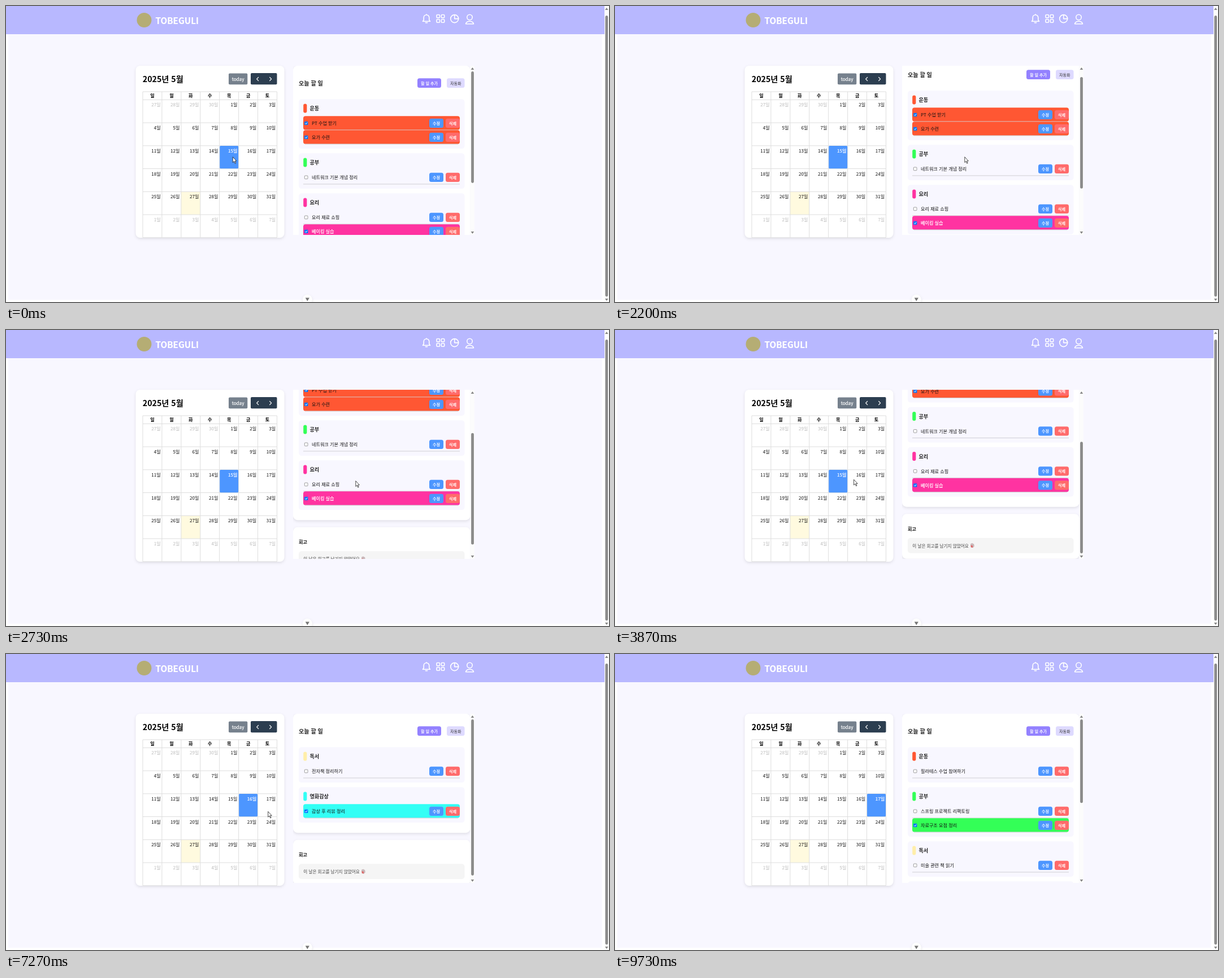
These frames come from a looping animation (1067 by 525 pixels, 9870 ms). An HTML page:

```html
<!DOCTYPE html>
<html lang="ko">
<head>
<meta charset="utf-8">
<title>TOBEGULI</title>
<style>
  html, body { margin: 0; width: 100%; height: 100%; overflow: hidden; background: #fff; }
  svg { display: block; width: 1067px; height: 525px; }
  text { font-family: "Noto Sans CJK KR", "Noto Sans KR", "Noto Sans CJK", "Noto Sans CJK JP", sans-serif; white-space: pre; }
  text[fill="#fff"] { stroke: #fff; stroke-width: .22px; }
  .card { fill: #fff; filter: drop-shadow(0 2px 2.5px rgba(0, 0, 0, .1)); }
  .icon { fill: none; stroke: #fff; stroke-width: 1.6; stroke-linecap: round; stroke-linejoin: round; }
  .grid { fill: none; stroke: #ddd; stroke-width: 1; }
</style>
</head>
<body>
<svg id="stage" viewBox="0 0 1067 525" xmlns="http://www.w3.org/2000/svg"></svg>
<script>
const LOOP = 9870, FRAME = 1000 / 15;
const BLUE = '#4d96ff', ORANGE = '#ff5733', GREEN = '#33ff57', PINK = '#ff33a1', CREAM = '#ffeeaa', CYAN = '#33fff5';
const VIEW = { top: 106, height: 300, trackTop: 116, track: 280 };

const rect = (x, y, w, h, fill, r = 0, extra = '') =>
  `<rect x="${x}" y="${y}" width="${w}" height="${h}" rx="${r}" fill="${fill}" ${extra}/>`;
const path = (d, attrs) => `<path d="${d}" ${attrs}/>`;
// Text is placed by its vertical middle.
const text = (s, x, mid, size = 8.11, fill = '#111', weight = 400, anchor = 'start') =>
  `<text x="${x}" y="${mid + size * .39}" font-size="${size}" fill="${fill}" font-weight="${weight}" text-anchor="${anchor}">${s}</text>`;
const button = (s, x, y, w, h, fill, color = '#fff') =>
  rect(x, y, w, h, fill, 3.5) + text(s, x + w / 2, y + h / 2 + .2, 7.1, color, 400, 'middle');
const triangle = (x, y, w, h, fill = '#858585') =>
  path(`M${x - w} ${y - h}H${x + w}L${x} ${y + h}Z`, `fill="${fill}"`);

function header() {
  const tiles = [[762, 15.5], [770.3, 15.5], [762, 23.8], [770.3, 23.8]]
    .map(([x, y]) => `<rect class="icon" x="${x}" y="${y}" width="5.4" height="5.4" rx="1.2"/>`).join('');
  return rect(0, 0, 1059, 50, '#b8b8ff')
    + '<circle cx="244.5" cy="25" r="13" fill="#b5ad74"/>'
    + text('TOBEGULI', 264.5, 26, 15.2, '#fff', 700)
    + path('M737.5 27.3H750.5L748.8 24.8V20.5A4.8 4.8 0 0 0 739.2 20.5V24.8ZM744 15.6V14.8M742.4 29.6H745.6', 'class="icon"')
    + tiles
    + '<circle class="icon" cx="793.7" cy="22.6" r="7"/>' + path('M793.7 15.6V22.6H800.7', 'class="icon"')
    + '<circle class="icon" cx="820.5" cy="20" r="4.7"/>' + path('M813.5 31.8C815 25.8 826 25.8 827.5 31.8Z', 'class="icon"');
}

const COL = 33.93, ROW = 40.75, LEFT = 242, TOP = 166.3;

function calendar() {
  let out = '<rect class="card" x="229.5" y="106" width="263" height="305" rx="8"/>'
    + text('2025년 5월', 241.8, 129.5, 14.2, '#000', 700)
    + rect(394, 119.5, 33.3, 19.7, '#76818d', 2) + text('today', 410.6, 129.6, 8.11, '#fff', 400, 'middle')
    + rect(433, 119, 46.5, 20.3, '#2c3e50', 2)
    + path('M446.7 126.4L443.7 129.5L446.7 132.6M466.6 126.4L469.6 129.5L466.6 132.6', 'class="icon" style="stroke-width:1.2"')
    + rect(LEFT + 2 * COL, TOP + 4 * ROW, COL, ROW, '#fffadf');
  let lines = `M${LEFT} 152H479.5`;
  for (let c = 0; c < 8; c++) lines += `M${LEFT + c * COL} 152V410.7`;
  for (let r = 0; r < 7; r++) lines += `M${LEFT} ${TOP + r * ROW}H479.5`;
  out += path(lines, 'class="grid"');
  [...'일월화수목금토'].forEach((d, c) => out += text(d, LEFT + (c + .5) * COL, 159.2, 8.11, '#000', 700, 'middle'));
  for (let i = 0; i < 42; i++) {
    const date = new Date(2025, 3, 27 + i);
    out += text(date.getDate() + '일', LEFT + (i % 7 + 1) * COL - 2.3, TOP + Math.floor(i / 7) * ROW + 8.8, 8.11,
      date.getMonth() === 4 ? '#111' : '#bbb', 400, 'end');
  }
  return out
    + `<g id="picked">${rect(LEFT + .5, TOP + 2 * ROW + .2, COL - 1, ROW - .6, BLUE, 1.5)}`
    + text('', LEFT + COL - 2.3, TOP + 2 * ROW + 8.8, 8.11, '#fff', 400, 'end') + '</g>'
    + `<rect id="caret" x="241.6" y="151.6" width="1" height="259" fill="#333"/>`;
}

const checkbox = (y, checked) => checked
  ? rect(528, y - 3.3, 6.4, 6.4, '#0075ff', 1.2) + path(`M529.5 ${y}l1.3 1.5l2.3 -3`, 'fill="none" stroke="#fff" stroke-width="1"')
  : rect(528.3, y - 3, 5.7, 5.7, '#fff', 1, 'stroke="#767676" stroke-width=".7"');

function task([label, done], y, color) {
  const mid = y + 12.8;
  return (done ? rect(526, y, 277, 24.6, color, 4) : '')
    + path(done ? `M529 ${y + 24.7}H800` : `M526 ${y + 24.7}H803`, 'stroke="#c4c4c8" stroke-width=".8"')
    + checkbox(mid, done)
    + text(label, 541, mid, 8.11, done && color === PINK ? '#fff' : '#111')
    + button('수정', 749, mid - 8.3, 25, 16.4, BLUE) + button('삭제', 778, mid - 8.3, 25, 16.4, '#ff6b6b');
}

function panel(groups) {
  let y = 165.2, body = '';
  for (const [name, color, ...tasks] of groups) {
    const pitch = 46 + 25 * tasks.length;
    body += rect(518, y, 293.5, pitch - 8.1, '#f8f7ff', 5)
      + rect(526.2, y + 8.2, 6.2, 16.2, color, 3)
      + text(name, 537.5, y + 16.4, 9.1, '#222', 700)
      + tasks.map((item, i) => task(item, y + 30 + 25 * i, color)).join('');
    y += pitch;
  }
  const end = y + 10, note = end + 12.6;
  const markup = `<rect class="card" x="508" y="106" width="313.5" height="${end - 106}" rx="8"/>`
    + text('오늘 할 일', 518, 137.2, 10.14, '#222', 700)
    + button('할 일 추가', 728, 128.3, 42, 16.8, '#9381ff') + button('자동화', 780, 128.3, 31.5, 16.8, '#dedaff', '#333')
    + body
    + `<rect class="card" x="508" y="${note}" width="313.5" height="79.5" rx="8"/>`
    + text('회고', 518, note + 26.4, 8.11, '#111', 700)
    + rect(518, note + 42.5, 293.5, 27, '#f5f5f5', 5)
    + text('이 날은 회고를 남기지 않았어요', 526.3, note + 56.4, 7.6, '#444')
    + path(`M629 ${note + 53}l3 -1.2l3.2 1.6l.6 4l-2.6 2.6l-3.6 -.8z`, 'fill="#c9b8ba"')
    + path(`M629.3 ${note + 55.5}l3.4 .5l.6 3.8l-3.2 -.6z`, 'fill="#dd6a6a"');
  return { markup, content: note + 79.5 - VIEW.top };
}

const days = {
  15: panel([
    ['운동', ORANGE, ['PT 수업 받기', 1], ['요가 수련', 1]],
    ['공부', GREEN, ['네트워크 기본 개념 정리', 0]],
    ['요리', PINK, ['요리 재료 쇼핑', 0], ['베이킹 실습', 1]]]),
  16: panel([
    ['독서', CREAM, ['전자책 정리하기', 0]],
    ['영화감상', CYAN, ['감상 후 리뷰 정리', 1]]]),
  17: panel([
    ['운동', ORANGE, ['필라테스 수업 참여하기', 0]],
    ['공부', GREEN, ['스프링 프로젝트 리팩토링', 0], ['자료구조 요점 정리', 1]],
    ['독서', CREAM, ['미술 관련 책 읽기', 0]],
    ['영화감상', CYAN, ['영화 고르기', 0]],
    ['요리', PINK, ['장보기', 0], ['저녁 준비', 0]]])
};

const stage = document.getElementById('stage');
stage.innerHTML = `<clipPath id="view">${rect(508, VIEW.top, 313.5, VIEW.height, '#000')}</clipPath>`
  + rect(4, 50, 1050.5, 471, '#f8f7ff') + header() + calendar()
  + rect(821.3, 106, 7.7, 300, '#fcfcfc')
  + '<g clip-path="url(#view)">'
  + Object.entries(days).map(([d, p]) => `<g id="day${d}">${p.markup}</g>`).join('') + '</g>'
  + triangle(825.4, 111, 2.8, -2) + triangle(825.4, 402, 2.8, 2)
  + '<rect id="thumb" x="823.1" width="4.8" rx="2.4" fill="#8b8b8b"/>'
  + rect(1059, 0, 8, 525, '#fcfcfc') + rect(1060.4, 17, 4.8, 498.5, '#8b8b8b', 2.4)
  + triangle(1062.8, 5, 2.8, -2) + triangle(1062.8, 521, 2.8, 2)
  + '<circle class="card" cx="533.3" cy="520.5" r="8.5"/>' + triangle(533.3, 520.4, 3.6, 3, '#777')
  + path('M0 0V9.8L2.3 7.7L3.9 11.5L5.4 10.9L3.8 7.2H6.6Z', 'id="cursor" fill="#fff" stroke="#111" stroke-width=".75"');

const el = Object.fromEntries(['picked', 'caret', 'thumb', 'cursor', 'day15', 'day16', 'day17']
  .map(id => [id, document.getElementById(id)]));

const START = [401.3, 267.7];
const moves = [
  { from: 1200, to: 1670, end: [618.8, 267.7], dip: 0 },
  { from: 3400, to: 3870, end: [422.6, 265.2], dip: 9.5 },
  { from: 5470, to: 5930, end: [569.3, 271.3], dip: 0 },
  { from: 6200, to: 6530, end: [463.7, 279.4], dip: 0 },
  { from: 8470, to: 9130, end: [166, 530], dip: 0 }
];
const caretOn = [[4930, 5570], [6130, 6670], [7200, 7270], [7530, 8070], [8590, 9130], [9670, 9730]];
const wheel = [[2070, 0], [2130, 3], [2200, 15], [2270, 40], [2330, 50.7], [2540, 50.7], [2600, 55], [2670, 77],
  [2730, 101], [2800, 114], [2870, 121.5], [2930, 124.5]];
const settle = [[5000, 3.6], [5200, 0]];

const clamp = v => Math.min(1, Math.max(0, v));
const smooth = p => p * p * (3 - 2 * p);

function along(keys, t) {
  let value = keys[0][1];
  for (let i = 1; i < keys.length; i++) {
    const [t0, v0] = keys[i - 1], [t1, v1] = keys[i];
    if (t >= t0) value = v0 + (v1 - v0) * clamp((t - t0) / (t1 - t0));
  }
  return value;
}

function cursorAt(t) {
  let [x, y] = START;
  for (const { from, to, end, dip } of moves) {
    const p = clamp((t - from) / (to - from)), e = smooth(p);
    x += (end[0] - x) * e;
    y += (end[1] - y) * e + dip * Math.sin(Math.PI * p);
  }
  return [x, y];
}

function draw(time) {
  // Fifteen held pictures a second, timed in whole hundredths.
  const t = Math.round(Math.floor((time % LOOP + 4) / FRAME) * FRAME / 10) * 10;
  const day = t < 5000 ? 15 : t < 7600 ? 16 : 17;
  const { content } = days[day];
  const scroll = day === 15 ? along(wheel, t) : day === 16 ? along(settle, t) : 0;

  for (const d in days) el['day' + d].style.display = d == day ? '' : 'none';
  el['day' + day].setAttribute('transform', `translate(0 ${-scroll})`);
  el.thumb.setAttribute('y', VIEW.trackTop + scroll / content * VIEW.track);
  el.thumb.setAttribute('height', VIEW.height / content * VIEW.track);

  el.picked.setAttribute('transform', `translate(${(day - 11) * COL} 0)`);
  el.picked.lastChild.textContent = day + '일';
  el.caret.style.display = caretOn.some(([a, b]) => t >= a && t < b) ? '' : 'none';
  el.cursor.setAttribute('transform', `translate(${cursorAt(t)})`);
}

const begun = performance.now();
function tick() {
  draw(performance.now() - begun);
  requestAnimationFrame(tick);
}
tick();
</script>
</body>
</html>
```
